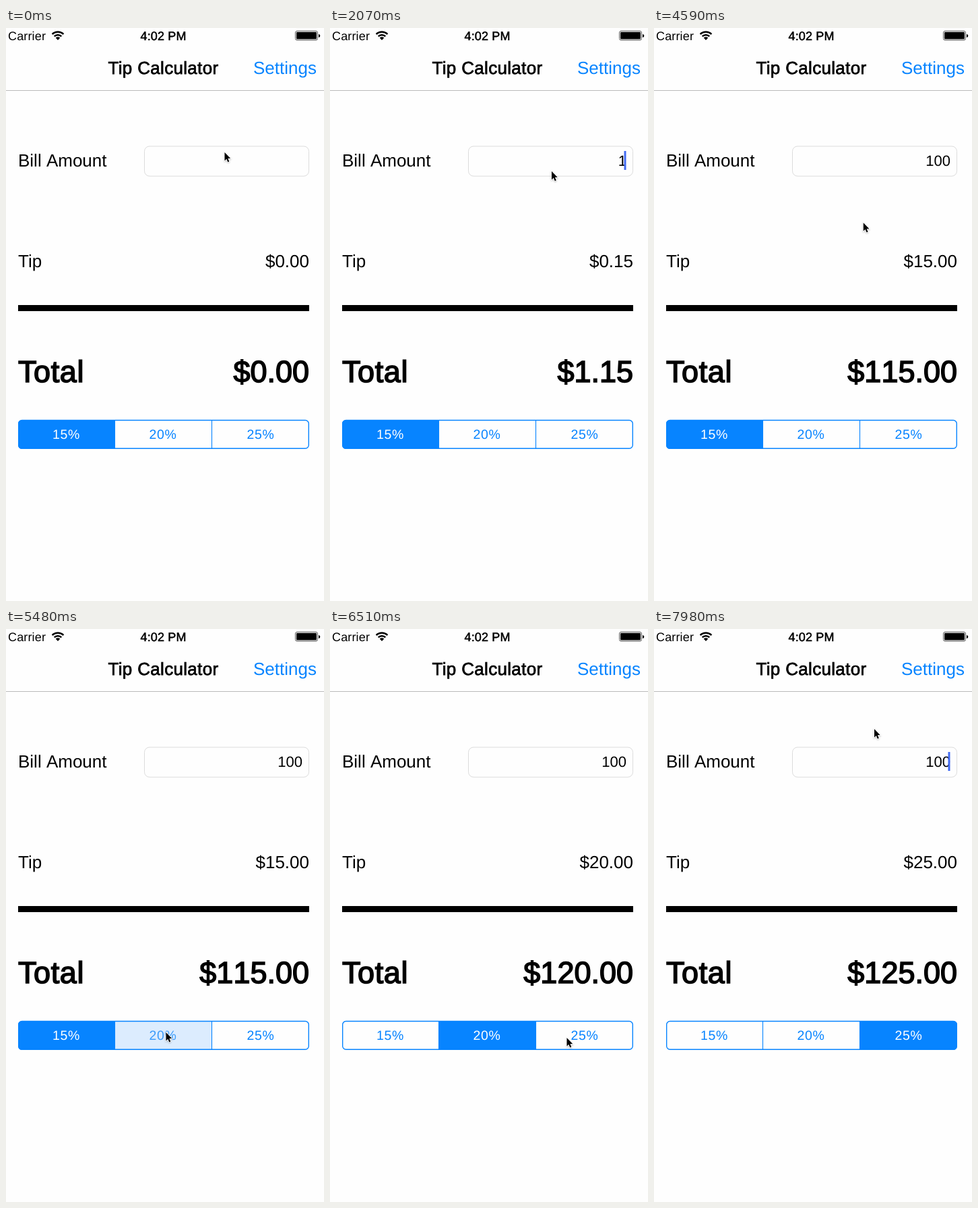
Recreate the animation shown at these times as an HTML page. Size 472x848 px, loop 8 s.

```html
<!DOCTYPE html>
<html lang="en">
<head>
<meta charset="utf-8">
<title>Tip Calculator</title>
<style>
  html, body { margin: 0; width: 100%; height: 100%; overflow: hidden; background: #fefefe; }
  svg { display: block; }
  text {
    font: 26px "Liberation Sans", Arial, sans-serif;
    font-kerning: none;
    text-rendering: geometricPrecision;
  }
  .kern { font-kerning: normal; }
  .end { text-anchor: end; }
  .medium { stroke: #000; stroke-width: .75px; letter-spacing: .32px; }
  .status { font-size: 18px; letter-spacing: .15px; }
  .clock { stroke-width: .5px; }
  .total { font-size: 45px; stroke: #000; stroke-width: 1.6px; }
  .total.kern { letter-spacing: .6px; }
  .bill { font-size: 22px; }
  .link { fill: #0784ff; }
  .segment rect { fill: none; }
  .segment text { font-size: 19.5px; letter-spacing: .7px; text-anchor: middle; fill: #0784ff; }
  .segment.pressed rect { fill: #dcecfe; }
  .segment.pressed text { fill: #3c9cfb; }
  .segment.selected rect { fill: #0784ff; }
  .segment.selected text { fill: #fff; }
</style>
</head>
<body>
<svg width="472" height="848" viewBox="0 0 472 848">
  <defs>
    <clipPath id="round"><rect x="18" y="580" width="432" height="43" rx="5.5"/></clipPath>
    <filter id="shadow" x="-50%" y="-50%" width="200%" height="200%">
      <feDropShadow dx="0" dy="1" stdDeviation="1" flood-opacity=".3"/>
    </filter>
  </defs>
  <rect width="472" height="848" fill="#fefefe"/>

  <!-- status bar -->
  <text class="status" x="3" y="18">Carrier</text>
  <g fill="none" stroke="#000" stroke-width="2.4">
    <path d="M68.6 9.2A12 12 0 0 1 85.4 9.2"/>
    <path d="M71.7 12.4A7.5 7.5 0 0 1 82.3 12.4"/>
  </g>
  <path d="M77 18L73.7 14.6A4.7 4.7 0 0 1 80.3 14.6Z"/>
  <text class="status medium clock" x="199.5" y="18">4:02 PM</text>
  <rect x="429.5" y="4.5" width="33" height="13.5" rx="2.5" fill="none" stroke="#555"/>
  <rect x="431" y="6" width="30" height="10.5" rx="1.2"/>
  <path d="M464 9Q466.3 9.5 466.3 11.5T464 14Z"/>

  <!-- navigation bar -->
  <text class="medium kern" x="151.5" y="68">Tip Calculator</text>
  <text class="link" x="367" y="68">Settings</text>
  <rect y="92" width="472" height="1" fill="#bababa"/>

  <!-- form -->
  <text x="18" y="205">Bill Amount</text>
  <rect x="205.5" y="175" width="244" height="44.2" rx="7.5" fill="#fefefe" stroke="#dcdcdc"/>
  <text id="bill" class="bill end" x="440" y="204"></text>
  <rect id="caret" x="436.5" y="182" width="3" height="28" fill="#426bf2"/>
  <text class="kern" x="18" y="354">Tip</text>
  <text id="tip" class="end" x="450" y="354">$0.00</text>
  <rect x="18" y="410" width="432" height="9"/>
  <text class="total kern" x="18" y="523.5">Total</text>
  <text id="total" class="total end" x="450" y="523.5">$0.00</text>

  <!-- tip rate -->
  <g clip-path="url(#round)">
    <g class="segment"><rect x="18" y="579" width="144" height="45"/><text x="89.5" y="608">15%</text></g>
    <g class="segment"><rect x="161" y="579" width="145" height="45"/><text x="233" y="608">20%</text></g>
    <g class="segment"><rect x="305" y="579" width="145" height="45"/><text x="378" y="608">25%</text></g>
  </g>
  <g fill="none" stroke="#0784ff" stroke-width="1.4">
    <rect x="18.7" y="580.5" width="430.6" height="41.8" rx="5"/>
    <path d="M161.5 580V622.5M305.5 580V622.5" stroke-width="1.1"/>
  </g>

  <path id="cursor" d="M0 0V12.4L2.8 9.8L4.8 14.4L6.8 13.5L4.9 9H8.7Z"
        stroke="#fff" stroke-width="1.4" paint-order="stroke" filter="url(#shadow)"/>
</svg>
<script>
  const LOOP = 8000, TICK = 147.75;
  const RATES = [.15, .2, .25];

  // Held values: [first tick, value]
  const BILL = [[0, ""], [14, "1"], [18, "10"], [19, "100"]];
  const SELECTED = [[0, 0], [38, 1], [46, 2]];
  const PRESSED = [[0, -1], [37, 1], [38, -1], [45, 2], [46, -1]];
  const CARET = [
    [0, 0], [6, .5], [7, 1], [9, .6], [10, 0], [13, 1], [17, .8], [18, 1],
    [22, .8], [23, .15], [24, 0], [26, 1], [29, .8], [30, .15], [31, 0],
    [33, 1], [36, .6], [37, 0], [40, 1], [43, .6], [44, 0],
    [47, 1], [50, .6], [51, 0], [54, 1]
  ];

  // Pointer moves along quadratic curves
  const MOVES = [
    { start: 2, end: 5, from: [324.5, 184], via: [327, 198], to: [329, 212] },
    { start: 29, end: 36, from: [329, 212], via: [283, 404], to: [237.5, 597] },
    { start: 39, end: 44, from: [237.5, 597], via: [294, 601], to: [351.5, 605] },
    { start: 48, end: 54, from: [351.5, 605], via: [147, 376], to: [327, 148] }
  ];

  const el = id => document.getElementById(id);
  const bill = el("bill"), caret = el("caret"), tip = el("tip"), total = el("total"), cursor = el("cursor");
  const segments = document.querySelectorAll(".segment");

  const held = (track, tick) => track.findLast(([first]) => first <= tick)[1];
  const money = value => "$" + value.toFixed(2);

  function pointerAt(tick) {
    const { start, end, from, via, to } = MOVES.findLast(m => m.start <= tick) || MOVES[0];
    const p = Math.min(1, Math.max(0, (tick - start) / (end - start)));
    const u = p * p * (3 - 2 * p), v = 1 - u;
    return from.map((a, i) => v * v * a + 2 * u * v * via[i] + u * u * to[i]);
  }

  function draw(time) {
    const tick = Math.floor(time % LOOP / TICK);
    const amount = held(BILL, tick);
    const selected = held(SELECTED, tick), pressed = held(PRESSED, tick);
    const tipValue = amount * RATES[selected];

    bill.textContent = amount;
    tip.textContent = money(tipValue);
    total.textContent = money(+amount + tipValue);
    caret.style.opacity = held(CARET, tick);
    segments.forEach((segment, i) => {
      segment.classList.toggle("selected", i === selected);
      segment.classList.toggle("pressed", i === pressed);
    });
    cursor.setAttribute("transform", `translate(${pointerAt(tick)})`);
  }

  const begin = performance.now();
  function frame() {
    draw(performance.now() - begin);
    requestAnimationFrame(frame);
  }
  frame();
</script>
</body>
</html>
```
